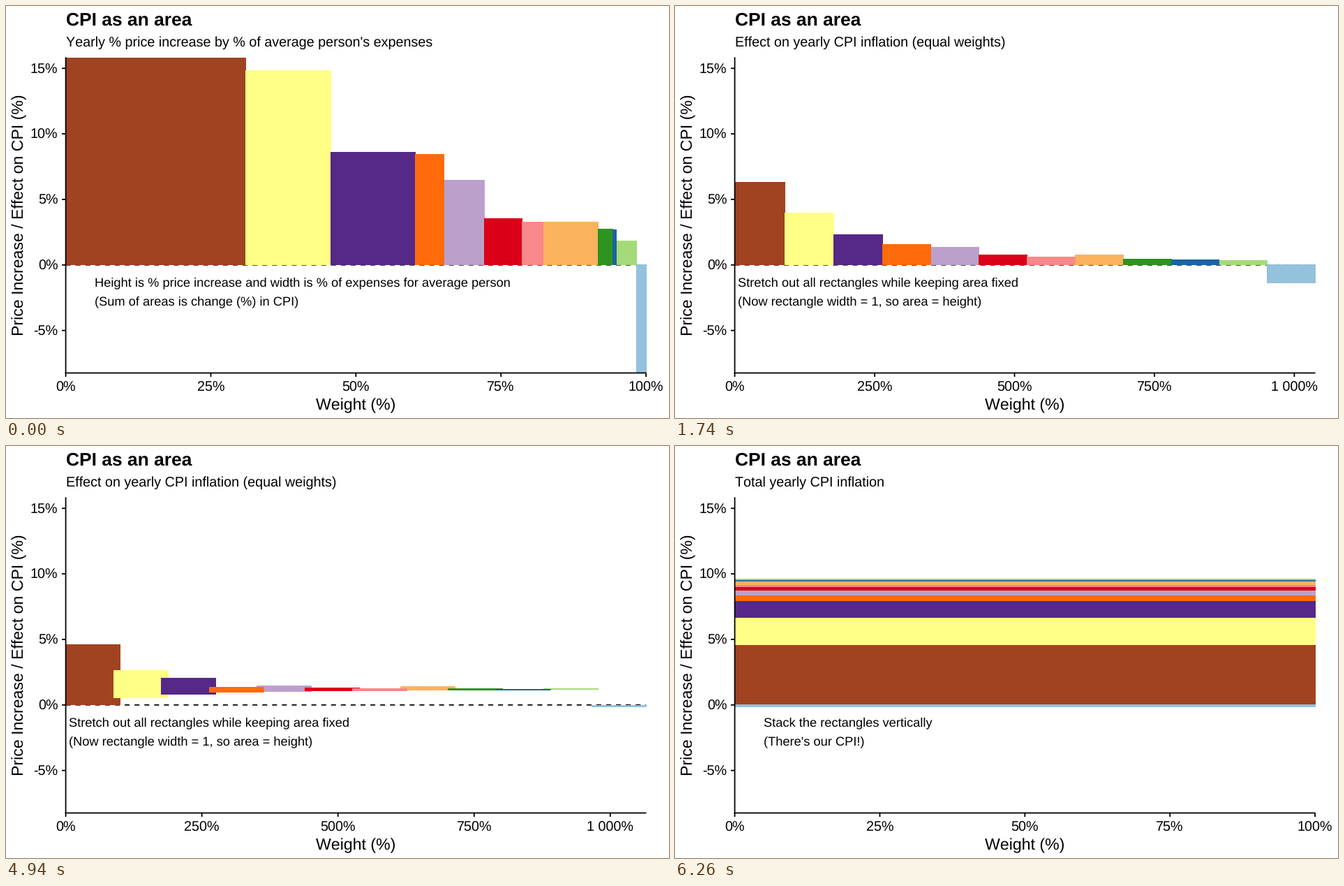
Recreate the animation shown at these times as a matplotlib script. Size 950 px wide and 590 px high, loop 8000 ms.

```python
import math

import matplotlib.pyplot as plt
import numpy as np
from matplotlib.animation import FuncAnimation
from matplotlib.patches import Rectangle

plt.rcParams["font.family"] = "Liberation Sans"
plt.rcParams["text.hinting"] = "none"
plt.rcParams["text.kerning_factor"] = 16  # effectively no kerning

W, H, DPI = 950, 590, 100
LEFT, RIGHT, TOP, BOTTOM = 85.6, 917.1, 73.6, 525.5
MID_X, MID_Y = (LEFT + RIGHT) / 2, (TOP + BOTTOM) / 2
ZERO, UNIT = 370.8, 18.77      # pixel row of 0 % and pixels per percent
LINE, TICK = 1.8, 5.6
STEP_MS, LOOP_MS = 20, 8000
MOVE_MS, STEPS = 40, 48
STARTS = (500, 4380)           # when each transition begins

# width %, price increase %, effect on CPI %, stacking order, colour
BARS = [
    (31.03, 15.80, 4.62, 12, "#A04320"),
    (14.67, 14.85, 2.08, 11, "#FFFF85"),
    (14.55, 8.57, 1.23, 10, "#562888"),
    (4.87, 8.45, 0.38, 8, "#FF6B0A"),
    (7.04, 6.46, 0.46, 9, "#BCA0CC"),
    (6.49, 3.55, 0.25, 6, "#DB0018"),
    (3.61, 3.29, 0.12, 5, "#FA8789"),
    (9.44, 3.29, 0.30, 7, "#FBB25D"),
    (2.59, 2.75, 0.07, 4, "#2D9321"),
    (0.54, 2.70, 0.015, 2, "#1C62A6"),
    (3.55, 1.82, 0.062, 3, "#A4DB78"),
    (1.62, -8.24, -0.15, 1, "#94C1DB"),
]

CAPTIONS = [
    ("Yearly % price increase by % of average person's expenses",
     "Height is % price increase and width is % of expenses for average person",
     "(Sum of areas is change (%) in CPI)"),
    ("Effect on yearly CPI inflation (equal weights)",
     "Stretch out all rectangles while keeping area fixed",
     "(Now rectangle width = 1, so area = height)"),
    ("Total yearly CPI inflation",
     "Stack the rectangles vertically",
     "(There's our CPI!)"),
]


def build_states():
    """Arrays of x0, x1, y0, y1 (all in percent) for the three layouts."""
    width, price, effect = (np.array([b[i] for b in BARS]) for i in range(3))
    n = len(BARS)
    zero = np.zeros(n)
    edge = np.concatenate([[0], np.cumsum(width)])
    edge[-1] = 100
    slot = 100.0 * np.arange(n + 1)
    gain = np.maximum(effect, 0)
    base = np.cumsum(gain) - gain
    low = np.where(effect < 0, effect, base)
    high = np.where(effect < 0, 0, base + gain)
    return [
        np.column_stack([edge[:-1], edge[1:], zero, price]),
        np.column_stack([slot[:-1], slot[1:], zero, effect]),
        np.column_stack([zero, zero + 100, low, high]),
    ]


STATES = build_states()


def nice_breaks(top, m=5):
    """Extended Wilkinson breaks for the range 0..top."""
    weights = (1, 5, 2, 2.5, 4, 3)
    best, step = -math.inf, top
    power = math.floor(math.log10(top))
    for i, q in enumerate(weights):
        for z in (power - 1, power):
            size = q * 10.0 ** z
            for k in range(2, 12):
                end = size * (k - 1)
                simple = 1 - i / (len(weights) - 1)
                cover = 1 - 0.5 * ((top - end) / (0.1 * top)) ** 2
                ratio = (k - 1) / end * max(end, top) / (m - 1)
                dense = 2 - max(ratio, 1 / ratio)
                score = 0.25 * simple + 0.2 * cover + 0.5 * dense + 0.05
                if score > best + 1e-9:
                    best, step = score, size
    return np.arange(0, math.floor(top / step + 1e-9) + 1) * step


def percent(v):
    return f"{v:,.0f}%".replace(",", " ")


def ease(t):
    return 4 * t ** 3 if t < 0.5 else 1 - 4 * (1 - t) ** 3


def y_px(v):
    return ZERO - UNIT * v


fig = plt.figure(figsize=(W / DPI, H / DPI), dpi=DPI, facecolor="white")
ax = fig.add_axes([0, 0, 1, 1])
ax.set_xlim(0, W)
ax.set_ylim(H, 0)
ax.axis("off")


def text(x, y, s, px, **kw):
    kw = {"ha": "left", "va": "baseline", "color": "black", **kw}
    return ax.text(x, y, s, fontsize=px * 72 / DPI, **kw)


def line(xs, ys, width=LINE, **kw):
    kw = {"color": "black", "zorder": 30, "solid_capstyle": "butt", **kw}
    art, = ax.plot(xs, ys, lw=width * 72 / DPI, snap=False, **kw)
    return art


text(LEFT, 27.4, "CPI as an area", 26.4, weight="bold")
text(MID_X, 577.8, "Weight (%)", 23.1, ha="center")
text(24.8, MID_Y, "Price Increase / Effect on CPI (%)", 23.1,
     rotation=90, rotation_mode="anchor", ha="center")

line([LEFT, LEFT], [TOP - 0.3, BOTTOM + LINE / 2])
line([LEFT - LINE / 2, RIGHT + 0.4], [BOTTOM, BOTTOM])
for v in (-5, 0, 5, 10, 15):
    line([LEFT - TICK, LEFT], [y_px(v)] * 2)
    text(74.4, y_px(v) + 7.1, percent(v), 19.8, ha="right")
line([LEFT, RIGHT], [ZERO, ZERO], 1.76, zorder=1, ls=(0, (4, 4)),
     dash_capstyle="butt")

subtitle = text(LEFT, 58, "", 19.8)
notes = [text(0, y, "", 18.22, zorder=25) for y in (401, 427.8)]
ticks = [(line([0, 0], [BOTTOM, BOTTOM + TICK]),
          text(0, 551.4, "", 19.8, ha="center")) for _ in range(12)]
rects = [ax.add_patch(Rectangle((0, 0), 1, 1, fc=b[4], lw=0, ec="none",
                                zorder=15 - b[3], snap=False,
                                antialiased=False))
         for b in BARS]


def progress(ms):
    """Index of the layout being left and the linear progress to the next."""
    leg = 0 if ms < STARTS[1] else 1
    k = (ms - STARTS[leg]) // MOVE_MS + 1
    return leg, min(max(k, 0), STEPS) / STEPS


def draw(frame):
    leg, t = progress(frame * STEP_MS)
    e = ease(t)
    boxes = STATES[leg] * (1 - e) + STATES[leg + 1] * e
    top = boxes[:, 1].max()

    def x_px(v):
        return LEFT + (RIGHT - LEFT) * v / top

    for rect, (x0, x1, y0, y1) in zip(rects, boxes):
        rect.set_bounds(x_px(x0), y_px(y0), x_px(x1) - x_px(x0),
                        y_px(y1) - y_px(y0))

    head, *body = CAPTIONS[leg + (t >= 0.5)]
    subtitle.set_text(head)
    for note, s in zip(notes, body):
        note.set_text(s)
        note.set_x(x_px(5))

    breaks = nice_breaks(top)
    for i, (mark, label) in enumerate(ticks):
        shown = i < len(breaks)
        mark.set_visible(shown)
        label.set_visible(shown)
        if shown:
            x = x_px(breaks[i])
            mark.set_xdata([x, x])
            label.set_x(x)
            label.set_text(percent(breaks[i]))
    return rects + notes + [subtitle]


anim = FuncAnimation(fig, draw, frames=LOOP_MS // STEP_MS, interval=STEP_MS,
                     init_func=lambda: draw(0), repeat=True, repeat_delay=0,
                     blit=False)
plt.show()
```
